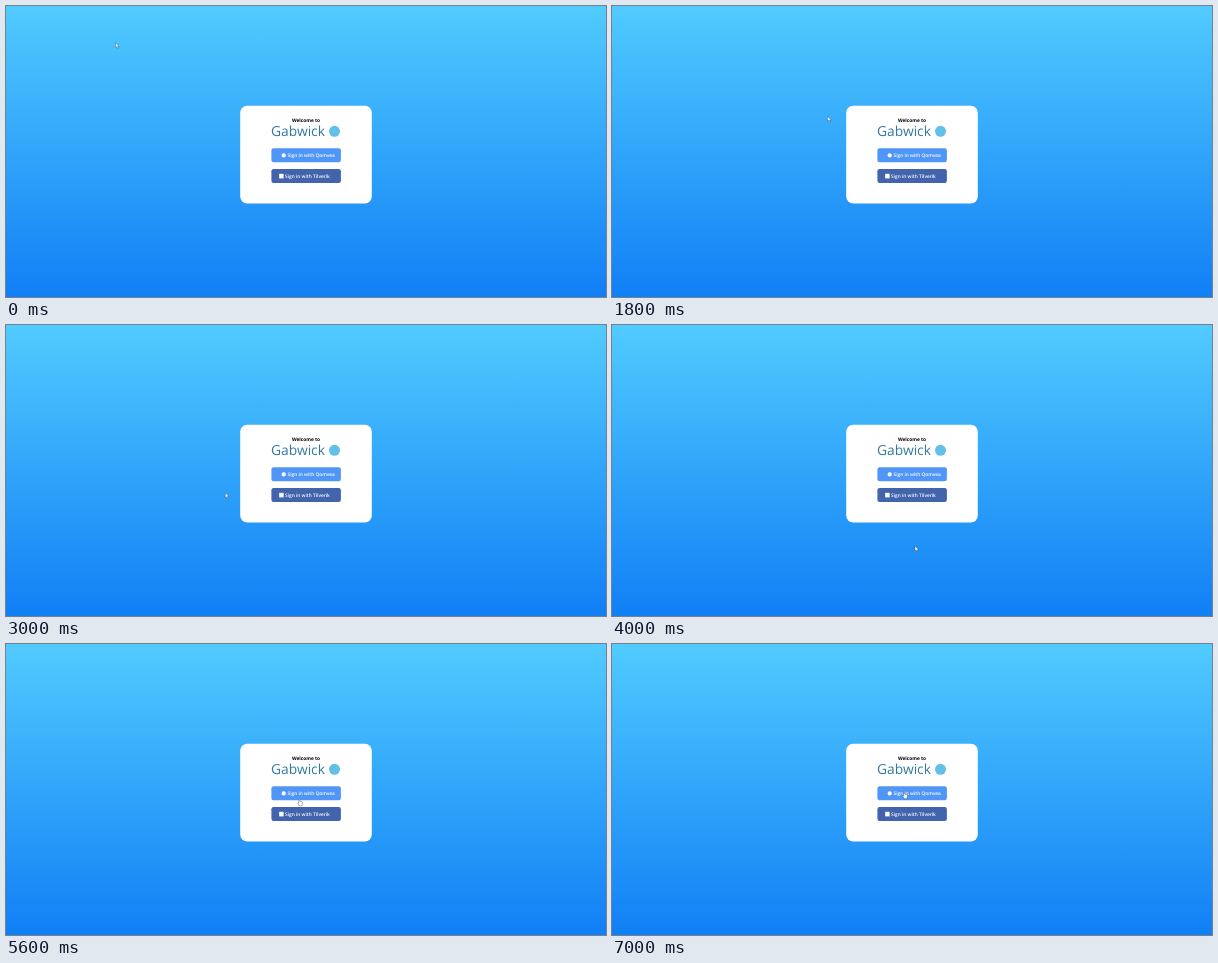
Write an HTML page that moves like this. It is 600x291 px and loops after 8 s.

```html
<!DOCTYPE html>
<html lang="en">
<head>
<meta charset="utf-8">
<title>Sign in</title>
<style>
  html, body { margin: 0; width: 100%; height: 100%; overflow: hidden; }
  svg { display: block; width: 100%; height: 100%; }
  text { font-family: "Open Sans", "Noto Sans", sans-serif; text-rendering: geometricPrecision; }
  .label { font-size: 4.8px; font-weight: 600; fill: #fff; }
</style>
</head>
<body>
<svg viewBox="0 0 600 291" preserveAspectRatio="none">
  <defs>
    <linearGradient id="sky" x2="0" y2="1">
      <stop stop-color="#51cbff"/>
      <stop offset="1" stop-color="#117ff5"/>
    </linearGradient>
  </defs>
  <rect width="600" height="291" fill="url(#sky)"/>
  <rect x="234.2" y="99.8" width="131.6" height="97.7" rx="7" fill="#fff"/>

  <text x="300" y="116.3" text-anchor="middle" font-size="4.8" font-weight="700">Welcome to</text>
  <text x="265" y="130" font-size="13.8" fill="#33799f">Gabwick</text>
  <circle cx="328.5" cy="125.3" r="5.5" fill="#62bfe8"/>

  <rect x="265.4" y="142.2" width="69.5" height="14" rx="2.2" fill="#5096f6"/>
  <circle cx="277.7" cy="149.4" r="2.1" fill="#fff"/>
  <text class="label" x="281.5" y="151.3">Sign in with Qomvea</text>

  <rect x="265.4" y="163.1" width="69.5" height="13.9" rx="2.2" fill="#4264ad"/>
  <rect x="273.2" y="167.8" width="4.4" height="4.6" fill="#fff"/>
  <text class="label" x="279" y="172">Sign in with Tilverik</text>

  <g id="cursor" fill="#fff" stroke="#222c3a" stroke-width=".35" stroke-linejoin="round">
    <path id="arrow" d="M0 0V5L1.2 4 2 5.9 2.8 5.5 2 3.8H3.6Z"/>
    <path id="hand" d="M-.5 .5Q0-.2 .5 .5V2.7L2.9 3.2Q3.5 3.5 3.3 4.5L2.7 7.3H.2L-1.7 4.5Q-1.5 3.7-.5 4.5Z"/>
  </g>
</svg>
<script>
const LOOP = 8000, STEP = 200;

// Key points: [time, x, y]
const approach = [[0, 109.5, 36.7], [600, 110, 116.5], [800, 110, 116.5], [1200, 104.5, 109], [1800, 215.5, 110.3]];
const settle = [[5000, 342, 193], [5600, 293.2, 154.6], [5800, 292.5, 161], [6200, 292.2, 147.4]];
// Circling the card, clockwise from its left side: [time, degrees, scale]
const orbit = [[2000, 20, 1], [3000, 342, 1], [4000, 630, 1], [4400, 788, 1], [5000, 955, .78]];

const linear = u => u;
const smooth = u => u * u * (3 - 2 * u);
const $ = id => document.getElementById(id);

function along(keys, time, ease) {
  const next = keys.findIndex(([at]) => at > time);
  if (next < 0) return keys.at(-1).slice(1);
  const [t0, ...from] = keys[next - 1], [t1, ...to] = keys[next];
  const u = ease((time - t0) / (t1 - t0));
  return from.map((value, i) => value + (to[i] - value) * u);
}

function pointerAt(time) {
  if (time < 2000) return along(approach, time, smooth);
  if (time >= 5000) return along(settle, time, smooth);
  const [degrees, scale] = along(orbit, time, linear);
  const angle = degrees * Math.PI / 180;
  return [303 - 88 * scale * Math.cos(angle), 144 - 77 * scale * Math.sin(angle)];
}

const overButton = (x, y) =>
  x > 265 && x < 335 && ((y > 142 && y < 156.3) || (y > 163 && y < 177));

function draw() {
  const time = performance.now() % LOOP;
  const [x, y] = pointerAt(Math.floor(time / STEP) * STEP);
  const hovering = overButton(x, y);
  $("cursor").setAttribute("transform", `translate(${x} ${y})`);
  $("hand").style.display = hovering ? "" : "none";
  $("arrow").style.display = hovering ? "none" : "";
  requestAnimationFrame(draw);
}
draw();
</script>
</body>
</html>
```
